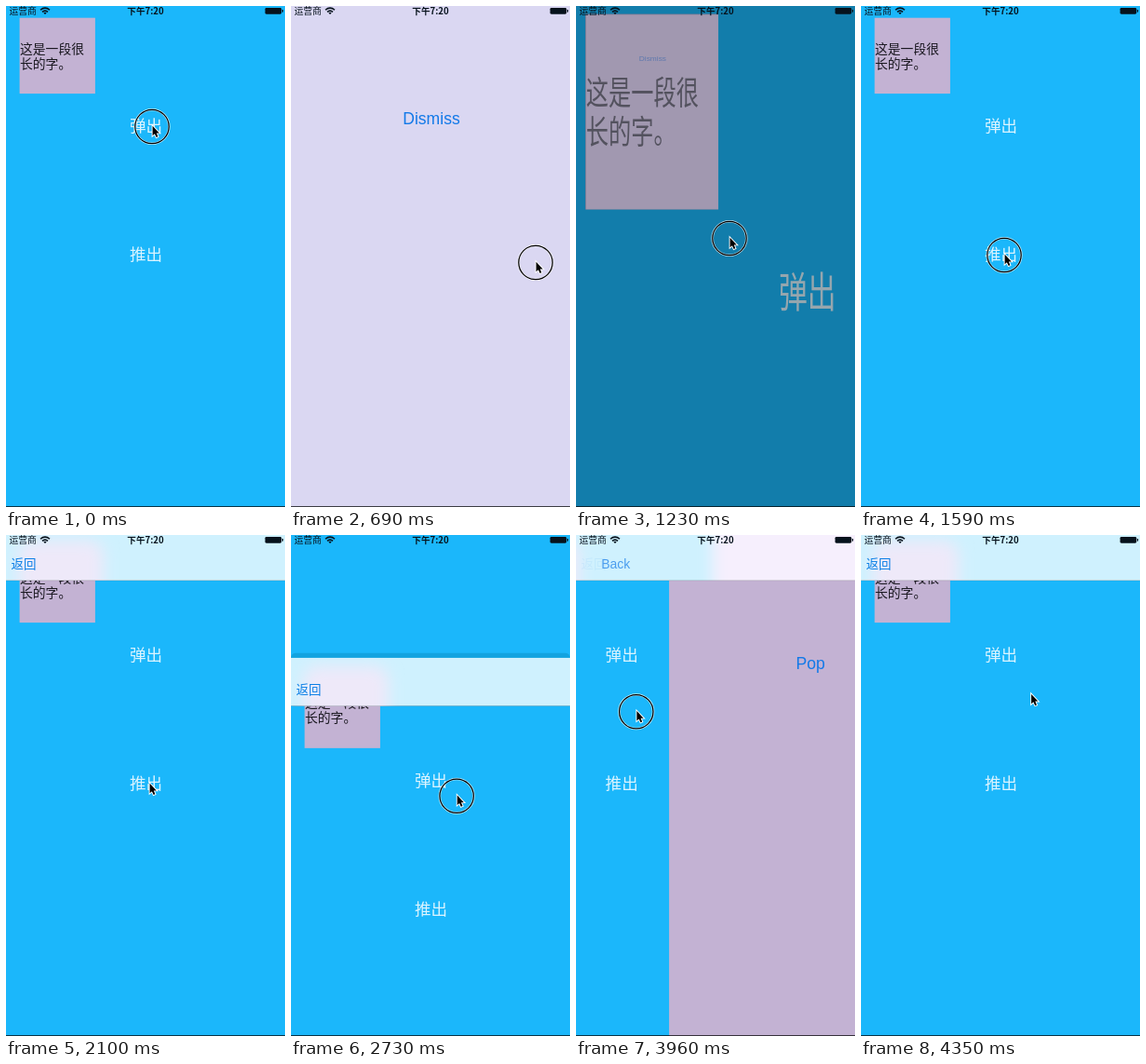
Recreate the animation shown at these times as an HTML page. Size 300x538 px, loop 4380 ms.

```html
<!DOCTYPE html>
<html lang="zh">
<head>
<meta charset="utf-8">
<style>
html, body { margin: 0; width: 100%; height: 100%; overflow: hidden; background: #000; }
svg { display: block; width: 100vw; height: 100vh; }
text { font-family: "Noto Sans CJK SC", "Noto Sans CJK", "Noto Sans CJK JP", sans-serif; }
.latin { font-family: "Liberation Sans", Arial, sans-serif; fill: #1279e8; }
.button { font-size: 17.6px; font-weight: 300; fill: #fff; fill-opacity: .84; text-anchor: middle; }
.note { font-size: 13.8px; fill: #1a1820; }
.link { font-size: 17.6px; text-anchor: middle; }
</style>
</head>
<body>
<svg viewBox="0 0 300 538" xmlns="http://www.w3.org/2000/svg">
  <defs>
    <clipPath id="barClip"><rect y="-3" width="300" height="52"/></clipPath>
    <filter id="soft" x="-50%" y="-50%" width="200%" height="200%"><feGaussianBlur stdDeviation="8"/></filter>
    <g id="content">
      <rect width="300" height="538" fill="#1bb7fb"/>
      <rect x="14.6" y="12.7" width="81.3" height="81.4" fill="#c3b2d3"/>
      <text class="note" x="15" y="50.6">这是一段很</text>
      <text class="note" x="15" y="66.6">长的字。</text>
      <text class="button" x="150.5" y="134.8">弹出</text>
      <text class="button" x="150.5" y="273.3">推出</text>
    </g>
  </defs>

  <rect width="300" height="538" fill="#000"/>
  <use id="home" href="#content"/>

  <g id="modal">
    <rect width="300" height="538" fill="#dad7f2"/>
    <text class="latin link" x="151" y="127">Dismiss</text>
  </g>

  <g id="nav">
    <rect y="-8" width="300" height="10" rx="5" fill="#12a3e0"/>
    <use id="under" href="#content"/>
    <g id="popPage">
      <rect width="300" height="538" fill="#c3b2d3"/>
      <text class="latin link" x="152" y="144">Pop</text>
    </g>
    <g clip-path="url(#barClip)">
      <rect y="-3" width="300" height="52" fill="#cff1fe"/>
      <rect id="glow" x="13" y="6" width="92" height="70" rx="16" fill="#eee9f9" filter="url(#soft)"/>
      <rect id="barTint" y="-40" width="380" height="140" fill="#f6effd" filter="url(#soft)"/>
    </g>
    <rect y="48.5" width="300" height=".6" fill="#000" opacity=".28"/>
    <text id="backZh" x="5.5" y="35.8" font-size="13.5" font-weight="500" fill="#0b7fe6">返回</text>
    <g id="backEn">
      <path id="chevron" d="M15 23L7 31L15 39" fill="none" stroke="#1279e8" stroke-width="2.2"/>
      <text class="latin" x="20.5" y="36" font-size="14">Back</text>
    </g>
  </g>

  <rect y="537" width="300" height="1" fill="#000" opacity=".72"/>

  <g id="status" fill="#06121c">
    <text x="3.5" y="9" font-size="9.8">运营商</text>
    <g fill="none" stroke="#06121c" stroke-width="1.5">
      <path d="M37 4.3Q42 0 47 4.3"/>
      <path d="M39 6.4Q42 3.8 45 6.4"/>
    </g>
    <path d="M40.4 7.4Q42 6 43.6 7.4L42 9.1Z"/>
    <text x="150" y="9" font-size="9.6" font-weight="600" text-anchor="middle">下午7:20</text>
    <rect x="278.6" y="1.9" width="17.6" height="6.8" rx="1.4"/>
    <rect x="296.8" y="3.9" width="1.3" height="2.8" rx=".6"/>
  </g>

  <g id="pointer">
    <g id="ring" fill="none">
      <circle cy="1.5" r="18.3" stroke="#fff" stroke-width="2.6" opacity=".7"/>
      <circle cy="1.5" r="18.2" stroke="#000" stroke-width="1.25"/>
    </g>
    <path d="M.6 .8V11.2L2.9 9.2L4.7 13L6.4 12.3L4.8 8.4H7.8Z" fill="#000" stroke="#fff" stroke-width="1.9" paint-order="stroke"/>
  </g>
</svg>

<script>
const LOOP = 4380, W = 300, H = 538;
const GRAB_Y = 144, HELD_ZOOM = .28;
const el = id => document.getElementById(id);
const mix = (a, b, k) => a + (b - a) * k;
const clamp = v => Math.min(1, Math.max(0, v));
const ease = k => k * k * (3 - 2 * k);
const ramp = (t, from, to) => ease(clamp((t - from) / (to - from)));
const within = (t, [from, to]) => t >= from && t < to;

// time, x, y of the pointer tip
const path = [
  [0, 157, 128], [240, 157, 128], [660, 263, 274], [720, 263, 274],
  [1230, 165, 248], [1290, 160, 251], [1500, 154, 266], [2110, 154, 266],
  [2280, 166, GRAB_Y], [2310, 166, GRAB_Y], [2570, 177, 318], [2600, 177, 318],
  [3026, 182, GRAB_Y], [3210, 147, 263], [3540, 147, 263], [3770, 12, 190],
  [3810, 12, 190], [4230, 191, 184], [4320, 191, 184], [4365, 180, 166], [LOOP, 157, 128]
];
const presses = [[0, 110], [650, 1300], [1530, 1620], [2290, 3030], [3215, 3300], [3790, 4335]];

function pointerAt(t) {
  const i = path.findIndex(key => key[0] > t);
  const a = path[i - 1], b = path[i];
  const k = ramp(t, a[0], b[0]);
  return [mix(a[1], b[1], k), mix(a[2], b[2], k)];
}

function zoomAt(t) {
  if (t < 720) return ramp(t, 90, 480);
  if (t < 1230) return mix(1, HELD_ZOOM, ramp(t, 720, 1230));
  return mix(HELD_ZOOM, 0, ramp(t, 1230, 1440));
}

function place(id, x, y, sx = 1, sy = 1) {
  el(id).setAttribute("transform", `translate(${x} ${y}) scale(${sx} ${sy})`);
}
function fade(id, alpha) {
  el(id).setAttribute("opacity", alpha);
}
function show(id, on) {
  el(id).style.display = on ? "" : "none";
}

function draw(t) {
  const [x, y] = pointerAt(t);
  const zoom = zoomAt(t);
  const dragging = within(t, [2310, 3026]);
  const drop = dragging ? y - GRAB_Y : H * (1 - ramp(t, 1620, 2010));
  const push = t < 3800 ? ramp(t, 3270, 3512) : 1 - ramp(t, 3810, 4200);

  // The lilac square grows to fill the stage and carries the home view along.
  const left = mix(15, 0, zoom), top = mix(13, 0, zoom);
  const width = mix(81, W, zoom), height = mix(81, H, zoom);
  const sx = width / 81, sy = height / 81;
  place("home", left - 15 * sx, top - 13 * sy + drop - H, sx, sy);
  fade("home", clamp(1 - zoom * 1.13));
  place("modal", left, top, width / W, height / H);
  fade("modal", clamp(zoom * 1.18));
  show("modal", zoom > 0);

  show("nav", drop < H);
  place("nav", 0, drop);
  place("under", -152 * push, 0);
  place("glow", -152 * push, 0);
  place("popPage", W * (1 - push), 0);
  place("barTint", 500 * (1 - push) - 20, 0);
  show("popPage", push > 0);
  show("barTint", push > 0);
  fade("backZh", clamp(1 - push * 1.4));
  fade("backEn", clamp(push * 1.5 - .3));
  fade("chevron", clamp((push - .7) / .3));
  place("backEn", 40 * clamp(1 - push * 1.25), 0);

  place("pointer", x, y);
  show("ring", presses.some(span => within(t, span)));
}

const start = performance.now();
function tick() {
  draw((performance.now() - start) % LOOP);
  requestAnimationFrame(tick);
}
draw(0);
requestAnimationFrame(tick);
</script>
</body>
</html>
```
